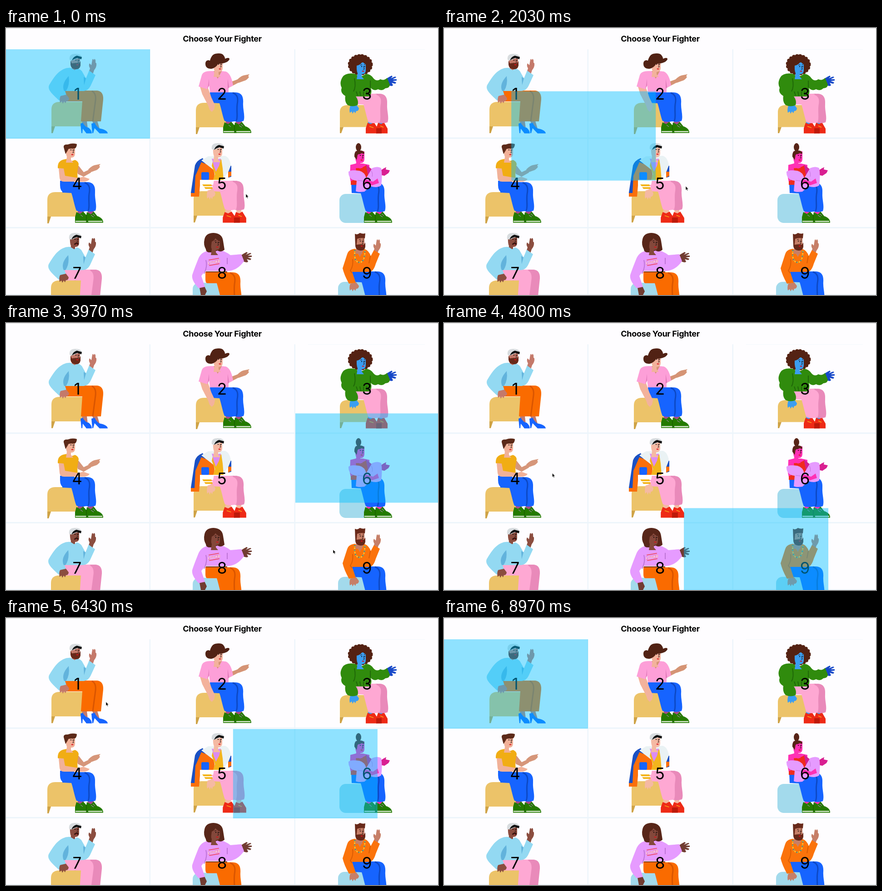
Animation of 951x589 px, one loop 9.01 s. Source, as an HTML page:

```html
<!DOCTYPE html>
<html lang="en">
<head>
<meta charset="utf-8">
<title>Choose Your Fighter</title>
<style>
html, body { margin: 0; width: 100%; height: 100%; overflow: hidden; background: #fefdff; }
svg { display: block; width: 951px; height: 589px; }
text { font-family: Inter, "Liberation Sans", sans-serif; text-anchor: middle; }
.title { font-size: 18px; font-weight: 700; letter-spacing: -.3px; }
.num { font-size: 35px; }
.skin { fill: var(--s); }
.main { fill: var(--c); }
.back { fill: var(--b); }
.fold { fill: none; stroke: var(--d); stroke-width: 3; }
.ink { fill: none; stroke: #2a1210; stroke-width: 1; }
.stool { --c: #ecc369; }
.blue { --c: #1664ff; --b: #1664ff; --d: #0d49c4; }
.pink { --c: #fea8d3; --b: #e98aba; --d: #e98aba; }
.orange { --c: #fa6b00; --b: #fa6b00; --d: #d95500; }
.pick { fill: #00bfff; fill-opacity: .44; animation: pick 9.01s linear infinite; }
.mouse { animation: mouse 9.01s ease-in-out infinite; }

@keyframes pick {
  0%, 17.35% { transform: translate(-1px, 47px); }
  28.45%, 28.58% { transform: translate(318px, 245px); }
  39.68%, 39.79% { transform: translate(637px, 47px); }
  50.89%, 51.39% { transform: translate(637px, 442px); }
  62.49%, 62.66% { transform: translate(-1px, 245px); }
  73.05% { transform: translate(596px, 245px); }
  84.15%, 100% { transform: translate(-1px, 47px); }
}
@keyframes mouse {
  0%, 17.4% { transform: translate(528px, 366px); }
  22.53% { transform: translate(532px, 349px); }
  27.6%, 29.3% { transform: translate(748px, 172px); }
  38.5%, 44.06% { transform: translate(720px, 500px); }
  50.6%, 52% { transform: translate(216px, 332px); }
  60.8%, 63.2% { transform: translate(739px, 315px); }
  71.37%, 73.4% { transform: translate(220px, 185px); }
  83.57%, 85% { transform: translate(226px, 191px); }
  93%, 100% { transform: translate(480px, 605px); }
}
</style>
</head>
<body>
<svg viewBox="0 0 951 589">
<defs>
  <g id="stool">
    <path class="main" d="M0 54V17Q0 0 18 0H72V54Z"/>
    <path fill="#cfa347" d="M0 54H8L3 69H0Z"/>
  </g>
  <rect id="pouf" width="70" height="64" rx="14" fill="#a3daec"/>

  <g id="legs">
    <path class="back" d="M478 142H504C518 142 523 150 522 165C521 180 527 194 523 205Q512 209 499 205L497 165Z"/>
    <path class="main" d="M449 142H490C505 142 511 150 509 166C506 184 510 196 506 205Q492 209 481 205C477 195 474 178 470 166L450 165Z"/>
    <path class="fold" d="M499 143C511 147 511 157 509 168C507 184 511 196 507 205"/>
  </g>
  <g id="trousers">
    <path class="back" d="M180 138H201Q215 140 214 158L209 206H189Z"/>
    <path class="main" d="M130 138H186Q200 140 198 158L190 206H165L168 162H131Z"/>
    <path class="fold" d="M189 139Q199 144 197 160L191 206"/>
  </g>

  <g id="sneakers">
    <path class="skin" d="M484 203H497V214H484ZM506 203H519V214H506Z"/>
    <g fill="#247a00">
      <path d="M478 231.500V219L481 208L489 212L496 207L505 217L508 231.500Z"/>
      <path d="M502 231.500V220L504 208L513 213L519 207L527 217Q540 221 540 231.500Z"/>
    </g>
    <path stroke="#fff" stroke-width="2" d="M479 228.500H503M507 228.500H538"/>
    <path stroke="#c78be0" d="M490 214L495 218M513 215L519 219M517 212L522 216"/>
    <path stroke="#145000" d="M503 214V231"/>
  </g>
  <g id="boots">
    <path class="skin" d="M797 204H809V214H797ZM820 204H830V214H820Z"/>
    <path fill="#ee2a16" d="M792 232.500V221L796 209L803 212L810 208L817 219V232.500Z"/>
    <path fill="#ee2a16" d="M815 232.500V221L819 209L826 212L832 208L840 222V232.500Z"/>
    <path fill="#bd1a0b" d="M815 221H827V232.500H815Z"/>
    <path stroke="#f6a21b" stroke-width="1.500" d="M800 217L809 220M824 216L831 219"/>
  </g>

  <path id="wave" class="skin" d="M182 98L185 89Q181 82 184 78L188 82L190 70Q192 66 193 71L195 68Q198 70 197 76L199 78Q200 86 194 93L191 102Z"/>
  <path id="reach" class="skin" d="M837 112Q843 108 849 105L851 107L847 111L857 107L859 109L851 113L860 113V116L851 117L859 120L857 123L849 121L852 126L850 128Q841 127 839 124Z"/>
  <path id="palm" class="skin" d="M509 114Q519 104 526 104L536 102L533 106L535 108Q531 115 523 117L512 121Z"/>
  <path id="rest" class="skin" d="M-8 -7L5 -10L11 -2Q10 5 5 4L3 9L0 5L-3 10L-5 5L-9 8Q-11 0 -8 -7Z"/>

  <g id="head">
    <path class="skin" d="M-10 -12H10V5Q10 14 1 14V19L6 25H-10L-8 12Q-11 6 -10 -12Z"/>
    <path class="ink" d="M-2 -6L2 -7M6 -7H9M5 -4L7 3H4"/>
    <circle cx="1" cy="-3" r="1.100"/><circle cx="7.500" cy="-3" r="1.100"/>
    <path fill="#d8131c" d="M1 7L4 6L7 7Q4 10 1 7Z"/>
  </g>
  <g id="cap">
    <path fill="#d8dcdf" d="M-13 -4Q-15 -17 0 -17Q13 -17 14 -9L4 -7L-8 -2Z"/>
    <path fill="#111" d="M-8 -2Q-5 -11 3 -13L14 -10L13 -5L4 -8L-4 -5Z"/>
  </g>
  <path id="beard" fill="#68291a" d="M-11 -2L-8 4L1 3L8 4L11 -1V9Q9 18 0 17Q-10 16 -11 7Z"/>

  <g id="sweater">
    <use href="#wave"/>
    <path fill="#93d9f2" d="M143 88Q134 87 126 91C112 98 104 111 95 126C91 136 100 144 117 160L134 151L130 139H171Q181 138 186 128L197 104L183 94L176 111L167 95Q162 90 157 89L151 93Z"/>
    <path fill="#62b3dc" d="M138 106Q141 126 132 139H128Q121 124 138 106ZM176 111L172 126L171 108Z"/>
    <use href="#rest" x="128" y="157"/>
  </g>
</defs>

<path fill="#dcdbdd" d="M0 0H951V1H0Z"/>
<g fill="#edf5fb">
  <path d="M315.500 47H318V589H315.500ZM634.500 47H637V589H634.500Z"/>
  <path d="M0 241.500H951V244.500H0ZM0 439H951V442H0ZM0 587.500H951V589H0Z"/>
  <path opacity=".6" d="M665 47H922V48H665Z"/>
</g>
<text class="title" x="476" y="30">Choose Your Fighter</text>

<!-- 1 -->
<g style="--s:#c4796a">
  <use href="#stool" class="stool" x="100" y="163"/>
  <path class="skin" d="M167 205H178L180 222L170 219ZM190 205H201L206 222L194 219Z"/>
  <use href="#trousers" class="orange"/>
  <g fill="#1664ff">
    <path d="M164 211L169 209Q174 219 182 220Q189 226 189 232.500H177L169 222L168 232H166Z"/>
    <path d="M188 211L195 209Q201 221 208 222Q223 225 224 232.500H206L195 221L192 232H190Z"/>
  </g>
  <use href="#head" x="153" y="74"/>
  <use href="#sweater"/>
  <use href="#beard" x="153" y="74"/>
  <path fill="#d8131c" d="M154 80H160L157 83Z"/>
  <use href="#cap" x="153" y="74"/>
</g>

<!-- 2 -->
<g style="--s:#f3b29c">
  <use href="#stool" class="stool" x="418" y="165"/>
  <g style="--s:#a54a8c"><use href="#sneakers"/></g>
  <use href="#legs" class="blue"/>
  <path fill="#d59475" d="M484 123L511 113L513 120L490 132Z"/>
  <g style="--s:#d59475"><use href="#palm"/></g>
  <path class="skin" d="M426 126L444 130L452 153L460 170L458 180L453 185L448 180L445 171L432 146Z"/>
  <path fill="#fd9fd8" d="M450 95Q434 95 431 104L424 129L443 135L447 126L449 142H490V132L500 127Q496 101 484 96L474 95L466 111L457 95Z"/>
  <path fill="#e079b9" d="M488 112L491 131L488 134ZM447 112V127L444 134Z"/>
  <path fill="#d59475" d="M457 95H475L466 112Z"/>
  <use href="#head" x="467" y="83"/>
  <g fill="#512214">
    <path d="M448 76Q451 60 460 57Q473 54 478 59Q484 66 482 74Z"/>
    <path d="M439 77Q438 90 452 90Q462 88 467 79Q488 78 492 69Q492 64 484 67Q476 72 465 73Q452 74 446 71Q440 71 439 77Z"/>
  </g>
</g>

<!-- 3 -->
<g style="--s:#3b9ef1">
  <use href="#stool" class="stool" transform="translate(735 170) scale(1 .9)"/>
  <use href="#boots"/>
  <use href="#legs" class="pink" x="317" y="3"/>
  <g fill="#542213">
    <ellipse cx="780" cy="81" rx="25" ry="22"/>
    <g fill="none" stroke="#542213" stroke-width="8" stroke-linecap="round" stroke-dasharray="0 7">
      <ellipse cx="780" cy="81" rx="23.500" ry="19.500"/>
    </g>
  </g>
  <g style="--s:#1748c8"><use href="#reach"/></g>
  <use href="#rest" x="766" y="179"/>
  <path fill="#308b0d" d="M768 101Q748 98 741 108Q733 121 739 132Q735 143 747 150Q745 163 752 170Q763 175 774 170Q777 160 770 151H800Q807 143 803 132Q810 140 819 135Q828 140 835 133Q845 132 845 125L839 110Q832 117 824 113Q816 119 809 111Q802 101 792 101Q782 111 768 101Z"/>
  <path fill="none" stroke="#1f6708" stroke-width="2" d="M767 111Q771 130 765 140M802 116V132M771 140L774 149M779 140L781 150M787 140V150M794 139V149"/>
  <use href="#head" x="782" y="88"/>
  <path fill="#542213" d="M766 86Q764 68 780 70Q795 70 796 82Q788 79 785 74Q780 82 772 83L770 98Z"/>
</g>

<!-- 4 -->
<g style="--s:#f1b198">
  <use href="#stool" class="stool" x="91" y="362"/>
  <g style="--s:#a54a8c"><use href="#sneakers" x="-326" y="198"/></g>
  <use href="#legs" class="blue" x="-326" y="198"/>
  <path fill="#1664ff" d="M119 337H150V363H128Q119 360 119 347Z"/>
  <path fill="#d6967a" d="M153 304L160 304L171 318L184 312L187 319L171 328L158 322Z"/>
  <g style="--s:#d6967a"><use href="#palm" x="-328" y="198"/></g>
  <path fill="#f1ad14" d="M133 289Q114 291 114 306V309L122 312L126 336H158L157 318L160 300Q159 294 152 291L143 294Z"/>
  <path class="skin" d="M116 309L127 310L130 326L160 331L170 328L184 333Q180 340 166 339H128Q119 339 118 331Z"/>
  <use href="#head" x="142" y="272"/>
  <path fill="#5c2a19" d="M131 278L127 263Q126 256 136 257Q146 253 156 256Q156 268 145 266Q137 265 136 270Z"/>
</g>

<!-- 5 -->
<g style="--s:#f5b9a3">
  <use href="#stool" class="stool" x="413" y="360"/>
  <use href="#boots" transform="translate(-375 197) scale(1.076 1)"/>
  <use href="#legs" class="pink" x="1" y="195"/>
  <use href="#rest" transform="translate(451 367) scale(.9 1.200)"/>
  <path fill="#1a50c3" d="M433 287Q420 292 416 303L407 363V372H424L427 340L440 300Z"/>
  <path fill="#fa6f0c" d="M430 296L417 326L415 364H407V372H425L428 335H458L460 308Z"/>
  <path fill="#1a50c3" d="M488 303L496 304V328L490 330Z"/>
  <path fill="#fa6f0c" d="M489 317H496V326L489 330Z"/>
  <path fill="#eaf2f4" d="M445 283L430 292L457 313L462 335H477L490 316L495 303Q492 285 482 282Z"/>
  <path fill="#f3b51d" d="M456 290L453 304L460 322L456 335H479L477 310L474 290Z"/>
  <path fill="#dc8cf3" d="M453 288L462 290L473 288L469 304L462 317L457 303Z"/>
  <rect x="430" y="318" width="17" height="17" rx="3" fill="#1664ff"/>
  <path fill="#fff" d="M427 335H458L456 346H427Z"/>
  <path fill="#f3b51d" d="M432 345H452L455 355H439Z"/>
  <path stroke="#fff" stroke-width="2" d="M434 350H455"/>
  <use href="#head" x="466" y="271"/>
  <use href="#cap" x="466" y="271"/>
</g>

<!-- 6 -->
<g style="--s:#ff31b4">
  <use href="#pouf" x="734" y="366"/>
  <use href="#sneakers" x="310" y="198"/>
  <use href="#legs" class="blue" x="311" y="199"/>
  <path class="skin" d="M770 299L758 302L757 330L760 345H800V302L786 299Z"/>
  <path fill="#ef2b1d" d="M770 307L780 310L793 303L800 312V346H759V338L772 332Z"/>
  <path fill="#d4208f" d="M792 301L806 312L812 340L800 346L796 320Z"/>
  <path fill="#d91f91" d="M822 316L831 310L837 307L836 312L845 314L842 320L833 326L824 324Z"/>
  <path fill="#e69bff" d="M754 317Q760 312 778 315Q790 318 793 331L806 309Q818 304 826 309Q829 327 826 347Q817 354 802 349L789 361Q775 363 770 360L772 337Q753 335 754 317Z"/>
  <path fill="#ff31b4" d="M789 333L808 339L818 332L821 342L806 347L789 342Z"/>
  <path fill="none" stroke="#c274dc" d="M803 314Q808 319 806 328M774 336L789 338"/>
  <use href="#head" x="779" y="284"/>
  <g fill="#572417">
    <ellipse cx="776" cy="263" rx="6" ry="9"/>
    <path d="M767 284Q766 269 778 270Q789 270 789 277Q779 275 774 280L772 291Z"/>
  </g>
</g>

<!-- 7 -->
<g style="--s:#8b4d3f">
  <use href="#stool" class="stool" x="99" y="557"/>
  <use href="#trousers" class="pink" x="-3" y="395"/>
  <use href="#head" x="151" y="469"/>
  <use href="#sweater" x="-1" y="395"/>
  <path fill="#351610" d="M150 476Q155 471 160 475L159 479L155 476L151 479Z"/>
  <use href="#cap" x="152" y="469"/>
</g>

<!-- 8 -->
<g style="--s:#713c31">
  <use href="#pouf" x="411" y="562"/>
  <use href="#legs" class="orange" x="-6" y="397"/>
  <path fill="#fa6b00" d="M439 538H470V563H443Q439 562 439 555Z"/>
  <use href="#reach" x="-319" y="389"/>
  <path class="skin" d="M426 573L437 570L442 581L438 589H429Z"/>
  <path fill="#e69bff" d="M449 491Q429 493 423 510Q413 535 410 545Q408 557 424 574L438 571L430 547L438 536H488Q510 535 524 514L518 499L494 501Q481 491 469 490Z"/>
  <path fill="none" stroke="#be75d6" stroke-width="2" d="M440 512Q444 526 436 542M487 507V521"/>
  <path stroke="#7c3516" stroke-width="2" d="M440 538H487"/>
  <g transform="translate(458 516) rotate(-10)">
    <path stroke="#f0414c" stroke-width="1.500" d="M-11 -6H12M-12 6H11"/>
    <text y="3.500" font-size="8.500" font-weight="700" font-style="italic" fill="#fff" stroke="#f0566a" stroke-width=".35">LOVER</text>
  </g>
  <path fill="#582619" d="M440 488Q434 478 437 466Q440 452 457 452Q476 453 478 470L481 489Q473 496 466 491L451 495Q440 496 440 488Z"/>
  <g style="--s:#84483b"><use href="#head" x="461" y="476"/></g>
  <path fill="#582619" d="M449 477V461H473V470Q464 469 461 463Q459 469 453 471L451 485Z"/>
</g>

<!-- 9 -->
<g style="--s:#c67f68">
  <use href="#pouf" x="731" y="560"/>
  <use href="#legs" class="blue" x="313" y="395"/>
  <use href="#wave" x="626" y="398"/>
  <use href="#rest" x="766" y="571"/>
  <path fill="#fb730b" d="M769 487Q754 488 751 499L741 530Q744 544 755 564L770 562L762 538H799Q809 538 814 520L823 498L810 490L803 503Q799 491 788 487L779 504Z"/>
  <path fill="none" stroke="#d95c05" stroke-width="2" d="M763 510Q765 525 758 535L762 541M802 503L799 519"/>
  <use href="#head" x="779" y="473"/>
  <path fill="#c67f68" d="M770 488H788L779 505Z"/>
  <path fill="none" stroke="#f2cf39" stroke-width="3" stroke-dasharray="3 2" d="M768 490Q765 516 778 517Q790 517 790 490"/>
  <path fill="none" stroke="#2387a0" stroke-width="3" stroke-dasharray="2 8" d="M768 490Q765 516 778 517Q790 517 790 490"/>
  <use href="#beard" x="780" y="474"/>
  <path fill="#d8131c" d="M780 480H786L783 483Z"/>
  <path fill="#68291a" d="M769 478L768 454Q774 457 779 452Q785 455 791 453L790 464Q781 462 773 465L772 476Z"/>
</g>

<g class="num">
  <text x="156.500" y="158">1</text><text x="475.500" y="158">2</text><text x="794.500" y="158">3</text>
  <text x="156.500" y="355.500">4</text><text x="475.500" y="355.500">5</text><text x="794.500" y="355.500">6</text>
  <text x="156.500" y="553">7</text><text x="475.500" y="553">8</text><text x="794.500" y="553">9</text>
</g>

<rect class="pick" width="318" height="197"/>
<path class="mouse" stroke="#fff" stroke-width=".5" d="M0 0V8.500L1.900 6.800L3.200 9.800L4.600 9.200L3.300 6.300H5.900Z"/>
</svg>
</body>
</html>
```
